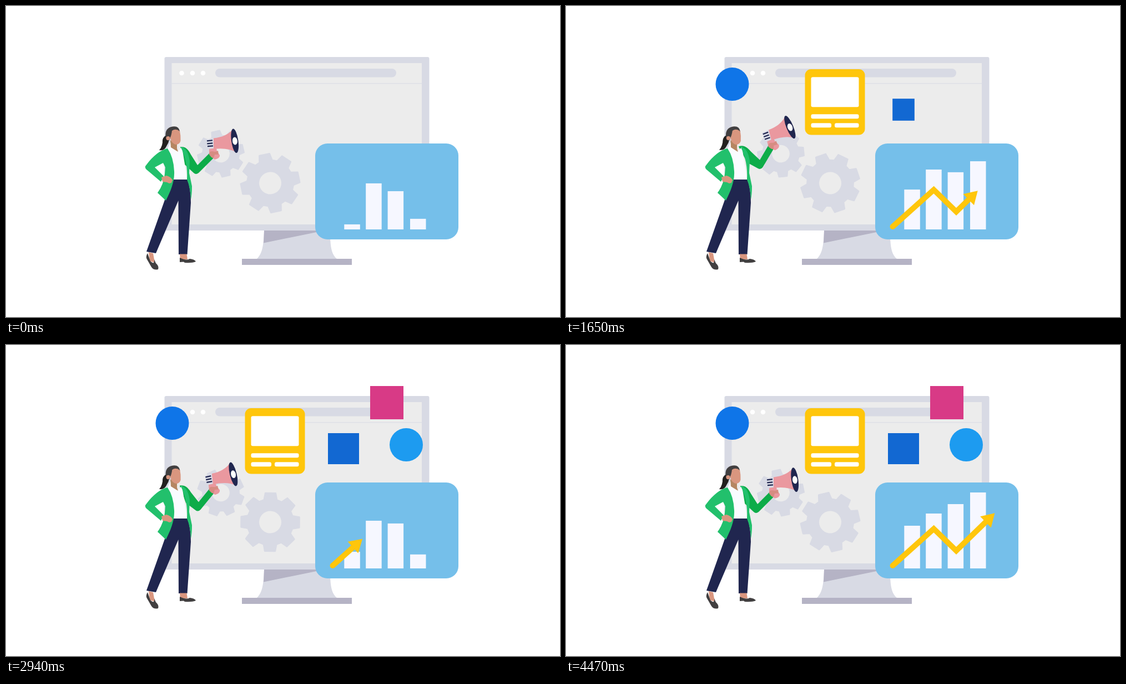
Write an HTML page that moves like this. It is 998 by 561 pixels and loops after 4.5 s.

```html
<!DOCTYPE html>
<html lang="en">
<head>
<meta charset="utf-8">
<title>Marketing dashboard</title>
<style>
  html, body { margin: 0; width: 100%; height: 100%; overflow: hidden; background: #fff; }
  svg { display: block; width: 100%; height: 100%; }
  .frame { fill: #d8dae4; }
  .shade { fill: #b5b3c5; }
  .screen { fill: #ececec; }
  .white { fill: #fff; }
  .yellow { fill: #ffc60b; }
  .green { fill: #22c06c; }
  .darkgreen { fill: #0dac49; }
  .navy { fill: #20264f; }
  .skin { fill: #d9967f; }
  .pink { fill: #ea989f; }
  .dark { fill: #413f40; }
</style>
</head>
<body>
<svg viewBox="0 0 998 561">
  <!-- monitor -->
  <path class="frame" d="M465 405H584C584 430 585 447 596 456H452C461 447 464 435 465 405Z"/>
  <path class="shade" d="M465 405H574L464 427.5ZM425 456H623V467H425Z"/>
  <rect class="frame" x="285.5" y="92" width="477" height="313" rx="3"/>
  <rect class="screen" x="298.5" y="103" width="450.5" height="291"/>
  <path d="M298.5 139.8H749" stroke="#d8dae4"/>
  <g class="white"><circle cx="316.5" cy="121" r="4.3"/><circle cx="336" cy="121" r="4.3"/><circle cx="355" cy="121" r="4.3"/></g>
  <rect class="frame" x="377" y="113" width="326" height="15.5" rx="7.7"/>

  <g id="smallGear"></g>
  <g id="bigGear"></g>

  <!-- chart -->
  <rect x="557" y="248" width="258" height="173" rx="22" fill="#75bfea"/>
  <g id="bars" fill="#f6f7ff"></g>
  <g id="arrow">
    <polyline id="shaft" fill="none" stroke="#ffc60b" stroke-width="10"/>
    <circle class="yellow" cx="588.5" cy="398" r="5"/>
    <path id="head" class="yellow" d="M14 0L-9-14V14Z"/>
  </g>

  <!-- items that pop up -->
  <g class="pop">
    <rect class="yellow" x="-54" y="-59.2" width="108" height="118.5" rx="11"/>
    <g class="white">
      <rect x="-43" y="-45" width="86" height="54" rx="3"/>
      <rect x="-43" y="22" width="86" height="8" rx="3"/>
      <rect x="-43" y="38" width="36.5" height="8" rx="3"/>
      <rect x="-.5" y="38" width="43.5" height="8" rx="3"/>
    </g>
  </g>
  <circle class="pop" r="30" fill="#0f75e8"/>
  <rect class="pop" x="-28" y="-28" width="56" height="56" fill="#1268d2"/>
  <rect class="pop" x="-30" y="-30" width="60" height="60" fill="#d83a86"/>
  <circle class="pop" r="30" fill="#1d9bf0"/>

  <!-- woman -->
  <g id="arm">
    <path class="darkgreen" d="M314 254C324 253 329 260 333 268L345 287L366 266L374 274L347 301Q342 305 338 301L322 286Z"/>
    <path fill="#d9dbe6" d="M361 241L375 238L376 257L363 257Z"/>
    <path d="M362 243.5L372 242.3M362.3 248.4L372.3 247.4M363 253.2L373 252.4" stroke="#20264f" stroke-width="2.2"/>
    <path class="pink" d="M374 238.5Q397 236 408 223L415 264Q400 255 374 258ZM366 258L379 256L380 262L385 269Q386 275 376 277L371 273L366 266Z"/>
    <ellipse class="navy" cx="412.2" cy="243.3" rx="6.2" ry="22" transform="rotate(-8 412.2 243.3)"/>
    <ellipse class="white" cx="412.4" cy="243.5" rx="4.4" ry="7" transform="rotate(-6 412.4 243.5)"/>
    <path fill="#d68c82" d="M366 268Q366 262 371 262L377 263L382 261L383 268L376 268L374 274L370 273Z"/>
  </g>
  <path class="navy" d="M302 313H327Q333 330 333 355L326.5 448H311L310.5 351L270 446L253 443L287 347Z"/>
  <path class="skin" d="M257 444L265 446L268 463L259 460ZM313 447.5H325.5L327 457H314Z"/>
  <path class="dark" d="M255 446Q251 452 254 457L262 471Q266 477 274 475Q276 469 270 464L267 457Q268 468 260 460ZM313 454Q325 460 331 456Q340 457 342 461Q335 464 322 463L320 461.5L313 462Z"/>
  <path fill="#fafbff" d="M291 257L296 246L310 262L317 254L326.5 313H301Z"/>
  <g id="face">
    <path fill="#22201f" d="M289 233Q281 237 282 246Q281 255 276 260Q285 262 289 253Q293 247 294 241Z"/>
    <path fill="#b58662" d="M296 242L308 248V257L310 263L297 255Z"/>
    <path class="skin" d="M297 226Q305 218 313 225Q315 234 314.5 243Q313 250 306 250Q298 248 296 238Z"/>
    <path class="dark" d="M288 238Q285 223 296 218.5Q311 214 313 226Q306 220 299 225Q298 233 296 237Q295 243 292 244Z"/>
    <circle class="skin" cx="292" cy="238.5" r="3.6"/>
  </g>
  <path class="green" d="M291 257C276 260 262 274 251 289Q250 292 253 295L279 317L284 307L268 291L283 283L287 291L286 303Q284 322 273 337L288 351C297 333 304 316 303 298Q302 273 291 257Z"/>
  <path class="green" d="M314.5 254Q328 256 331 280L330 301L335 325Q335 340 333 349Q332 327 326 313Q328 281 314.5 254Z"/>
  <path class="skin" d="M280 309L289 306Q297 308 300 314L298 319L294 320L290 318L282 317Z"/>
</svg>
<script>
const LOOP = 4500;
const $ = id => document.getElementById(id);
const clamp = (v, lo = 0, hi = 1) => Math.min(hi, Math.max(lo, v));

// Piecewise interpolation through key times and values.
function at(t, times, values) {
  let i = 1;
  while (i < times.length - 1 && t > times[i]) i++;
  const u = clamp((t - times[i - 1]) / (times[i] - times[i - 1]));
  return values[i - 1] + (values[i] - values[i - 1]) * u;
}

const polar = (r, deg) => [Math.sin(deg * Math.PI / 180) * r, -Math.cos(deg * Math.PI / 180) * r];
const teeth = [];
for (let a = 0; a < 360; a += 45)
  teeth.push(polar(41.5, a - 16), polar(53, a - 10), polar(53, a + 10), polar(41.5, a + 16));
for (const id of ['bigGear', 'smallGear'])
  $(id).innerHTML = `<polygon class="frame" points="${teeth.join(' ')}" stroke="#d8dae4" stroke-width="3" stroke-linejoin="round"/><circle class="screen" r="20"/>`;

const barX = [609.3, 648.2, 687.6, 728];
$('bars').innerHTML = barX.map(x => `<rect x="${x}" width="28.5"/>`).join('');
const bars = [...$('bars').children];
const barTimes = [0, 540, 1140, 2100, 2430, 2940, 3510, 4470];
const barHeights = [
  [9, 40, 74, 70, 5, 30, 63, 77],
  [83, 109, 100, 115, 40, 86, 97, 99],
  [69, 40, 101, 105, 40, 81, 111, 116],
  [19, 84, 132, 115, 10, 25, 122, 137]
];

const route = [[588.5, 398], [662.5, 331.5], [703, 371], [784, 292]];

function drawArrow(t) {
  const length = t < 2145
    ? at(t, [60, 540, 1140, 2100], [0, 65, 150, 263])
    : at(t, [2430, 2940, 3510, 4320, 4470], [0, 72, 143, 238, 253]);
  $('arrow').style.display = length > 0 ? '' : 'none';
  let left = Math.max(0, length - 14);
  const points = [route[0]];
  for (let i = 1; i < route.length; i++) {
    const [x, y] = route[i - 1], dx = route[i][0] - x, dy = route[i][1] - y;
    const size = Math.hypot(dx, dy), u = Math.min(1, left / size);
    const end = [x + dx * u, y + dy * u];
    points.push(end);
    left -= size;
    if (left <= 0) {
      const angle = Math.atan2(dy, dx) * 180 / Math.PI;
      $('head').setAttribute('transform', `translate(${end}) rotate(${angle})`);
      break;
    }
  }
  $('shaft').setAttribute('points', points.join(' '));
}

const pops = [...document.querySelectorAll('.pop')];
const popPlaces = [[484.5, 173.2], [299.5, 141], [608, 187], [686, 104], [721, 180]];
const popScale = age => at(age, [0, 250, 320], [0, 1.22, 1]);

const armTimes = [0, 270, 540, 840, 1140, 1600, 2100, 4500];
const armAngles = [0, -11, -19.5, -22, -21.5, -15, -9, 0];

function draw(t) {
  const turn = t * 0.05;
  $('bigGear').setAttribute('transform', `translate(476 319.5) rotate(${turn - 11.5})`);
  $('smallGear').setAttribute('transform', `translate(387 266.5) scale(.79) rotate(${-turn - 13})`);

  bars.forEach((bar, i) => {
    const height = at(t, barTimes, barHeights[i]);
    bar.setAttribute('y', 403 - height);
    bar.setAttribute('height', height);
  });
  drawArrow(t);

  pops.forEach((item, i) =>
    item.setAttribute('transform', `translate(${popPlaces[i]}) scale(${popScale(t - 820 - 343 * i)})`));

  const lift = at(t, armTimes, armAngles);
  $('arm').setAttribute('transform', `rotate(${lift} 310 266)`);
  $('face').setAttribute('transform', `rotate(${-lift * 0.1} 300 258)`);
}

const start = performance.now();
function tick() {
  draw((performance.now() - start) % LOOP);
  requestAnimationFrame(tick);
}
tick();
</script>
</body>
</html>
```
